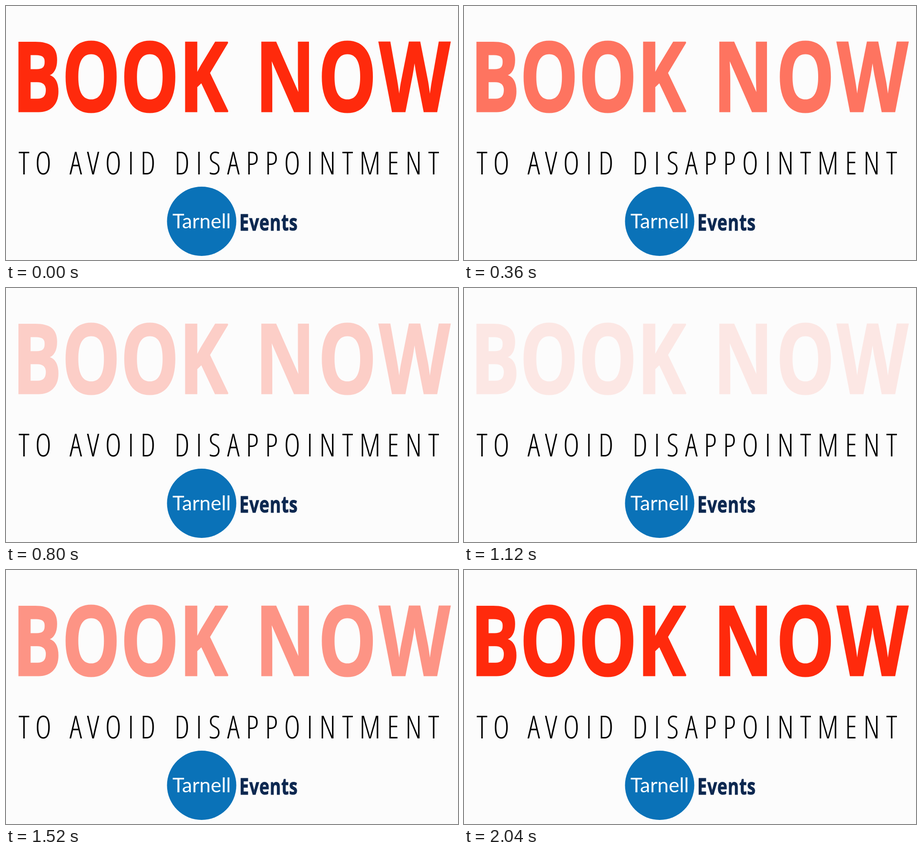
These frames come from a looping animation (998 by 561 pixels, 2.08 s). An HTML page:

```html
<!DOCTYPE html>
<html lang="en">
<head>
<meta charset="utf-8">
<title>Book now</title>
<style>
  html, body { margin: 0; width: 100%; height: 100%; overflow: hidden; background: #fcfcfc; }
  svg { display: block; width: 100%; height: 100%; }
  text { text-anchor: middle; font-family: "Open Sans", "Noto Sans", sans-serif; }
  .cond { font-stretch: 75%; }
  #title, #brand { font-weight: 700; stroke-miterlimit: 2; }
  #title { font-size: 214px; fill: #ff2a0c; stroke: #ff2a0c; stroke-width: 3px; }
  #line { font-weight: 300; font-size: 69.5px; }
  #brand { font-size: 49.5px; fill: #0d2850; stroke: #0d2850; stroke-width: 1px; }
  #disc text { font: 44.5px Lato, "Open Sans", sans-serif; fill: #fff; }
</style>
</head>
<body>
<svg viewBox="0 0 998 561">
  <g id="title"></g>
  <g id="line"></g>
  <g id="disc">
    <circle cx="432" cy="475.5" r="76.5" fill="#0a72b8"/>
    <text x="432" y="491">Tarnell</text>
  </g>
  <g id="brand"></g>
</svg>
<script>
const LOOP = 2080, STEP = 40, FADE = 1020;
const title = document.getElementById('title');

// Adds a condensed word centred on x; narrows it only if no condensed face exists.
function word(id, str, x, y, track = 0) {
  const el = document.createElementNS('http://www.w3.org/2000/svg', 'text');
  el.textContent = str;
  document.getElementById(id).append(el);
  const wide = el.getComputedTextLength();
  el.classList.add('cond');
  const k = el.getComputedTextLength() > wide * 0.95 ? 0.76 : 1;
  el.style.letterSpacing = track / k + 'px';
  el.setAttribute('transform', `translate(${x + track / 2} ${y}) scale(${k} 1)`);
}

word('title', 'BOOK', 252, 232.5);
word('title', 'NOW', 765.5, 232.5, 6.5);
word('line', 'TO', 64, 371.5, 13.7);
word('line', 'AVOID', 235.3, 371.5, 13.7);
word('line', 'DISAPPOINTMENT', 664, 371.5, 13.7);
word('brand', 'Events', 579.5, 495.5, 0.8);

// The title fades out and back in linearly.
const start = performance.now();
function draw() {
  const t = Math.floor((performance.now() - start) % LOOP / STEP) * STEP;
  title.setAttribute('opacity', Math.abs(1 - t / FADE));
  requestAnimationFrame(draw);
}
draw();
</script>
</body>
</html>
```
